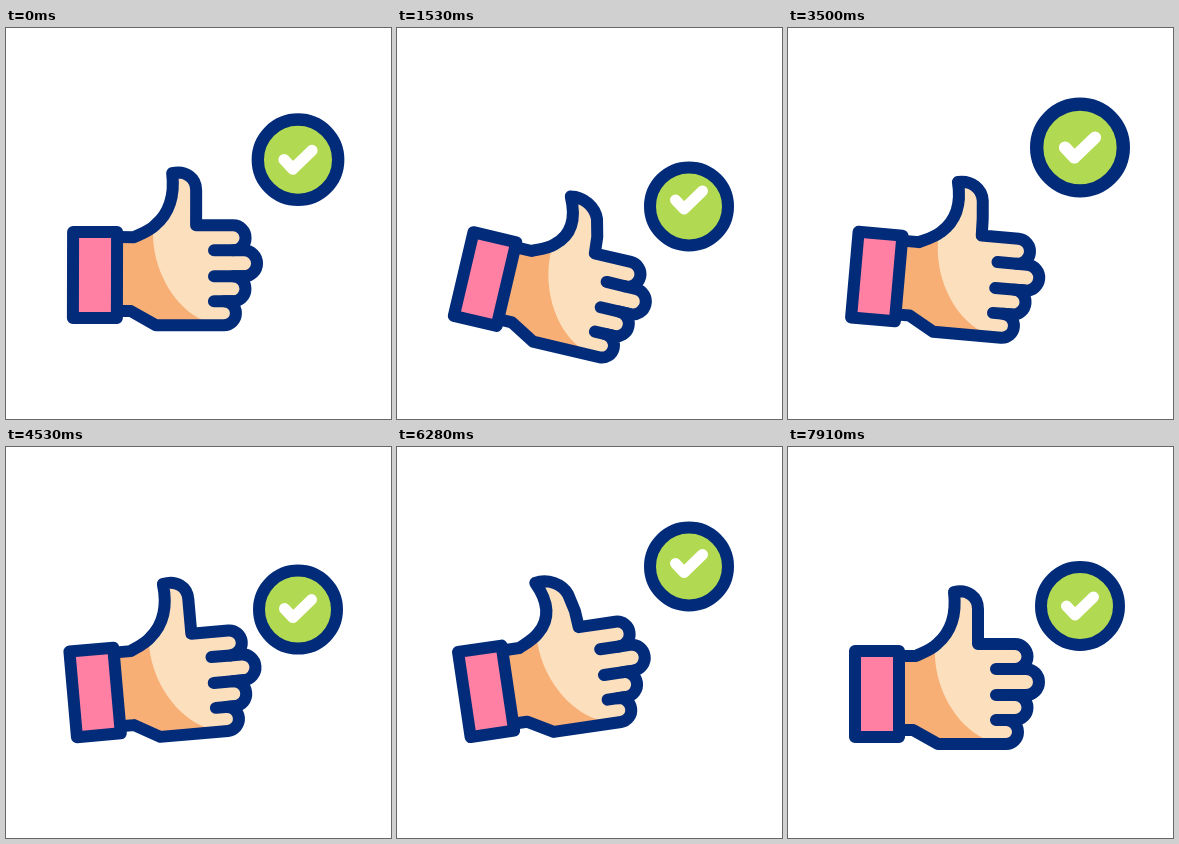
These frames come from a looping animation (385 px wide and 391 px high, 8000 ms). An HTML page:

```html
<!DOCTYPE html>
<html lang="en">
<head>
<meta charset="utf-8">
<title>Thumbs up</title>
<style>
  html, body { margin: 0; width: 100%; height: 100%; overflow: hidden; background: #fff; }
  svg { display: block; width: 100%; height: 100%; }
  .line { stroke: #022b7a; stroke-width: 12; stroke-linecap: round; stroke-linejoin: round; }
</style>
</head>
<body>
<svg viewBox="0 0 385 391">
  <g id="hand">
    <path id="skin" fill="#fcdfbd"/>
    <path fill="#f7af75" d="M111 209H128Q139 206 147 200C145 240 168 279 197 292V297H150L125 283H111Z"/>
    <path id="outline" class="line" fill="none"/>
    <path class="line" fill="none" d="M208 222H227M208 248H238M208 273H227"/>
    <rect class="line" fill="#ff80a2" x="67" y="204" width="44" height="86"/>
  </g>
  <g id="badge">
    <circle class="line" fill="#b2d952" r="39"/>
    <path id="tick" fill="none" stroke="#fff" stroke-width="11" stroke-linecap="round" stroke-linejoin="round" d="M-13.5 0L-5 9L13.5 -9"/>
  </g>
</svg>
<script>
const LOOP = 8000, CYCLE = 3755, REST = 500;
const $ = id => document.getElementById(id);

// Progress from a to b: linear, and eased at both ends.
const span = (t, a, b) => Math.min(1, Math.max(0, (t - a) / (b - a)));
const ramp = (t, a, b) => (1 - Math.cos(Math.PI * span(t, a, b))) / 2;
// Eases up from a to b and back down from b to c.
const bump = (t, a, b, c) => ramp(t, a, b) - ramp(t, b, c);

// The wrist lifts a little, then nods twice.
function tilt(t) {
  const lift = ramp(t, 590, 920) - ramp(t, 3090, 3800);
  const nods = bump(t, 920, 1555, 2450) + ramp(t, 2600, 3090) - ramp(t, 3090, 3800);
  return 21.7 * nods - 8.4 * lift;
}

// The badge sinks, flies up, swells and falls back.
const height = t => 159 + 25 * ramp(t, 560, 1430) - 64.5 * ramp(t, 1430, 1960) + 39.5 * ramp(t, 3555, 4090);
const scale = t => 1 + 0.13 * bump(t, 3000, 3350, 3950);
const bob = t => -7 * bump(t, 560, 1430, 1960) - 9 * Math.sin(2 * Math.PI * span(t, 2285, 2825));

// Outline of the hand; the thumb leans back more towards its tip.
function handPath(lean) {
  const p = (x, y) => {
    const u = Math.max(0, (198 - y) / 54) ** 2 * lean;
    return `${(x - 13 * u).toFixed(2)} ${(y + 2 * u).toFixed(2)} `;
  };
  return "M111 209H128" +
    "C" + p(134, 206) + p(143, 203) + p(149, 197) +
    "C" + p(162, 186) + p(169, 170) + p(166, 145) +
    "C" + p(180, 142) + p(190, 150) + p(190, 162) +
    "L" + p(190, 180) + "L" + p(190, 197) +
    "H227a12.5 12.5 0 0 1 0 25H238a13 13 0 0 1 0 26H227" +
    "a12.5 12.5 0 0 1 0 25H218a12 12 0 0 1 0 24H150L125 283H111";
}

function draw(time) {
  let t = (time % LOOP) % CYCLE;
  if (t < REST) t += CYCLE;
  const d = handPath(ramp(t, 850, 1400) - ramp(t, 3090, 3780));
  $("skin").setAttribute("d", d + "Z");
  $("outline").setAttribute("d", d);
  $("hand").setAttribute("transform", `rotate(${tilt(t)} 71 245)`);
  $("badge").setAttribute("transform", `translate(292 ${height(t)}) scale(${scale(t)})`);
  $("tick").setAttribute("transform", `translate(0 ${bob(t)})`);
}

const t0 = performance.now();
function frame() {
  draw(performance.now() - t0);
  requestAnimationFrame(frame);
}
frame();
</script>
</body>
</html>
```
